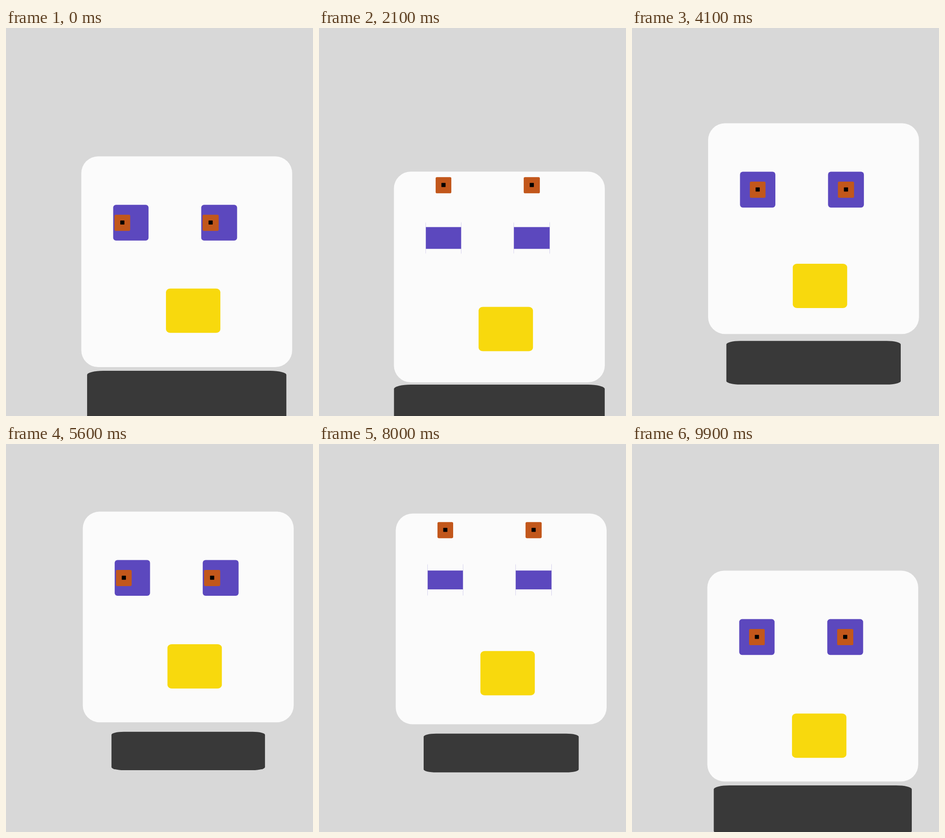
Recreate the animation shown at these times as an HTML page with a canvas. Size 666 px wide and 841 px high, loop 10 s.

```html
<!DOCTYPE html>
<html lang="en">
<head>
<meta charset="utf-8">
<title>Bobbing block head</title>
<style>
  html, body { margin: 0; width: 100%; height: 100%; overflow: hidden; background: #d8d8d8; }
  canvas { display: block; }
</style>
</head>
<body>
<canvas id="stage" width="666" height="841"></canvas>
<script>
const ctx = document.getElementById('stage').getContext('2d');
const LOOP = 10000, HALF = LOOP / 2, STEP = 100;
const RISE_START = 2430, GLANCE_START = 4930;
const HEAD_W = 457.5, HEAD_H = 456.8, EYE_H = 77.7;
const BACK = '#d8d8d8', SKIN = '#fbfbfb', SHADOW = '#393939';
const EYE = '#5c48be', IRIS = '#c2571b', PUPIL = '#000', MOUTH = '#f8d90d';

const mix = (a, b, k) => a + (b - a) * k;
const clamp = v => Math.min(1, Math.max(0, v));

// cubic-bezier(.25, .1, .25, 1)
function ease(x) {
  const curve = (s, p, q) => 3 * s * (1 - s) ** 2 * p + 3 * s * s * (1 - s) * q + s ** 3;
  let lo = 0, hi = 1;
  for (let i = 0; i < 30; i++) {
    const mid = (lo + hi) / 2;
    if (curve(mid, .25, .25) < x) lo = mid; else hi = mid;
  }
  return curve(lo, .1, 1);
}

function block(x, y, w, h, color) {
  ctx.fillStyle = color;
  ctx.beginPath();
  ctx.roundRect(x, y, w, h, { x: w * .08, y: h * .08 });
  ctx.fill();
}

function lids(x, y, w, h, top, bottom) {
  ctx.fillStyle = SKIN;
  if (top > 0) ctx.fillRect(x, y - 1, w, top + 1);
  if (bottom > 0) ctx.fillRect(x, y + h - bottom, w, bottom + 1);
}

// Rises for half the loop, sinks for the other half
function liftAt(t) {
  const phase = (t - RISE_START + LOOP) % LOOP;
  const part = ease((phase % HALF) / HALF);
  return phase < HALF ? part : 1 - part;
}

// Glance left, roll the irises up behind lowered lids, then look ahead
function faceAt(t) {
  const u = ((t - GLANCE_START + LOOP) % HALF) / HALF;
  const squint = clamp((u - .42) / .34);
  const held = u < .42 ? 0 : clamp((.82 - u) / .06);
  return {
    look: u < .42 ? 18.5 : 0,
    roll: mix(115, 103, squint) * held,
    lid: mix(15, 21, squint) * held,
    mouthY: mix(286.5, 310, u ** 1.5),
    shut: clamp(1 - Math.abs(u - .414) / .02)
  };
}

function drawEye(x, y, w, irisW, face) {
  block(x, y, w, EYE_H, EYE);
  lids(x, y, w, EYE_H, face.lid, face.lid);
  const ix = x + (w - irisW) / 2 - face.look;
  const iy = y + 21.5 - face.roll;
  block(ix, iy, irisW, 35, IRIS);
  block(ix + irisW / 2 - 4.5, iy + 12.6, 9, 8.8, PUPIL);
}

function draw(t) {
  const lift = liftAt(t), face = faceAt(t);
  const x = mix(162.5, 167, lift), y = mix(311.7, 129.4, lift);

  ctx.fillStyle = BACK;
  ctx.fillRect(0, 0, 666, 841);

  const sw = HEAD_W * mix(1, .7, lift), sh = sw / 4;
  block(x + (HEAD_W - sw) / 2, y + 519 - sh / 2, sw, sh, SHADOW);

  block(x, y, HEAD_W, HEAD_H, SKIN);
  drawEye(x + 69.2, y + 105, 76.7, 34, face);
  drawEye(x + 260.2, y + 105, 77.8, 35, face);

  const mx = x + 183.7, my = y + face.mouthY;
  block(mx, my, 118, 96, MOUTH);
  lids(mx, my, 118, 96, 33.5 * face.shut, 53 * face.shut);
}

const start = performance.now();
function tick() {
  const t = (performance.now() - start) % LOOP;
  draw(Math.floor(t / STEP) * STEP);
  requestAnimationFrame(tick);
}
tick();
</script>
</body>
</html>
```
